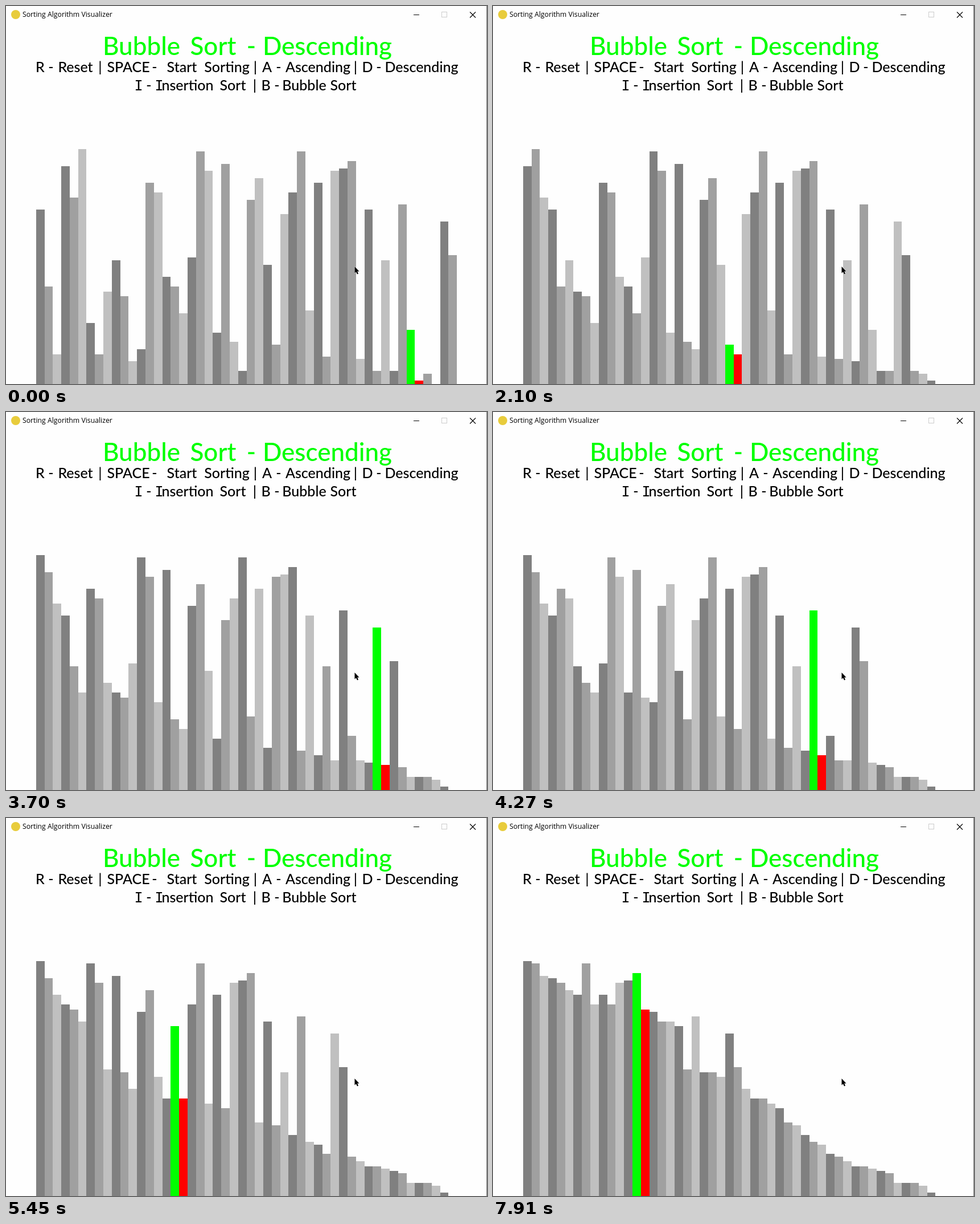
Recreate the animation shown at these times as an HTML page with a canvas. Size 845x663 px, loop 8000 ms.

```html
<!DOCTYPE html>
<html lang="en">
<head>
<meta charset="utf-8">
<title>Sorting Algorithm Visualizer</title>
<style>
  html, body { margin: 0; width: 100%; height: 100%; overflow: hidden; background: #fefefe; }
  canvas, svg { position: absolute; left: 0; top: 0; }
  .words { font-family: Lato, "Open Sans", sans-serif; font-weight: 500; text-anchor: middle; }
  .serif-i { font-family: "DejaVu Sans Mono", monospace; font-weight: 400; }
</style>
</head>
<body>
<canvas id="bars" width="845" height="663"></canvas>
<svg id="ui" width="845" height="663" viewBox="0 0 845 663">
  <path d="M844.5 0V663" stroke="#777"/>
  <circle cx="17" cy="15" r="8" fill="#e8cc3c"/>
  <text x="29" y="19" font-size="12.25" font-family="Open Sans, sans-serif">Sorting Algorithm Visualizer</text>
  <path d="M716 15.5H726" stroke="#000"/>
  <rect x="765.5" y="10.5" width="9" height="9" fill="none" stroke="#ccc"/>
  <path d="M815 10.5L825 20.5M825 10.5L815 20.5" stroke="#000" stroke-width="1.1"/>
  <path d="M612.5 457V468.5L615 466.3L617 470.5L619 469.5L617.2 465.6H620.5Z"
        stroke="#fff" stroke-width="1" paint-order="stroke"/>
</svg>
<script>
const LOOP = 8000, COUNT = 50, BOTTOM = 663;
const GREYS = ['#808080', '#a0a0a0', '#c0c0c0'];

// Each word is followed by the x of its centre.
const LINES = [
  [44, 86, '#0f0', 'Bubble 238 Sort 364 - 431 Descending 564.5'],
  [25, 116, '#000', 'R 60 - 79 Reset 122 | 165.5 SPACE 215 - 261 Start 309 Sorting 388 ' +
    '| 438 A 458.5 - 479 Ascending 548 | 614 D 635 - 655 Descending 730'],
  [25, 148, '#000', 'I 233 - 251 I 269 nsertion 319 Sort 398.5 | 437 B 456.5 - 476 Bubble 524 Sort 592.5']
];

function addLine([size, y, fill, words]) {
  const parts = words.split(' ');
  for (let i = 0; i < parts.length; i += 2) {
    const el = document.createElementNS('http://www.w3.org/2000/svg', 'text');
    const attrs = { x: parts[i + 1], y, fill, 'font-size': size,
                    class: parts[i] === 'I' ? 'words serif-i' : 'words' };
    for (const key in attrs) el.setAttribute(key, attrs[key]);
    el.textContent = parts[i];
    document.getElementById('ui').append(el);
  }
}
LINES.forEach(addLine);

// Top edge of every bar: a smaller number is a taller bar.
const tops = [
  357, 492, 611, 281, 336, 251, 556, 611, 501, 446, 509, 623, 602, 310, 327, 475, 492,
  539, 441, 255, 289, 573, 277, 589, 640, 340, 302, 454, 594, 365, 327, 255, 534, 310,
  615, 289, 285, 272, 619, 357, 640, 446, 640, 348, 568, 657, 645, 663, 378, 437
];

// Bubble sort in descending order, one state per swap, picked up mid-pass.
const START = 44;
const states = [{ pass: 0, j: START, tops: [...tops] }];
for (let pass = 0; pass < COUNT - 1; pass++) {
  for (let j = pass ? 0 : START + 1; j < COUNT - 1 - pass; j++) {
    if (tops[j] <= tops[j + 1]) continue;
    [tops[j], tops[j + 1]] = [tops[j + 1], tops[j]];
    states.push({ pass, j, tops: [...tops] });
  }
}

// Progress of the sort: time, pass, swapped index.
const keys = [
  [0, 0, 44], [1050, 2, 29], [3010, 6, 25], [4270, 9, 34],
  [5450, 13, 16], [6650, 17, 22], [7910, 24, 13]
].map(([time, pass, j]) => ({ time, step: states.findIndex(s => s.pass === pass && s.j === j) }));

// Screen refreshes: first, last, number.
const ticks = [0];
for (const [first, last, n] of [
  [120, 1050, 8], [1170, 2100, 8], [2220, 3010, 7], [3130, 3130, 1], [3280, 4270, 8],
  [4420, 5450, 9], [5600, 6530, 8], [6650, 7610, 8], [7760, 7910, 2]
]) {
  for (let i = 0; i < n; i++) ticks.push(first + (n > 1 ? (last - first) * i / (n - 1) : 0));
}

function stateAt(time) {
  const tick = ticks.findLast(t => t <= time + 0.01);
  const next = Math.max(1, keys.findIndex(k => k.time >= tick - 0.01));
  const a = keys[next - 1], b = keys[next];
  const part = (tick - a.time) / (b.time - a.time);
  return states[Math.round(a.step + (b.step - a.step) * part)];
}

const ctx = document.getElementById('bars').getContext('2d');
const edge = i => Math.round(52.75 + 14.79 * i);

function draw({ j, tops }) {
  ctx.clearRect(0, 0, 845, BOTTOM);
  tops.forEach((top, i) => {
    ctx.fillStyle = i === j ? '#0f0' : i === j + 1 ? '#f00' : GREYS[i % 3];
    ctx.fillRect(edge(i), top, edge(i + 1) - edge(i), BOTTOM - top);
  });
}

let begin;
function frame(now) {
  begin ??= now;
  draw(stateAt(Math.max(0, now - begin) % LOOP));
  requestAnimationFrame(frame);
}
draw(states[0]);
requestAnimationFrame(frame);
</script>
</body>
</html>
```
